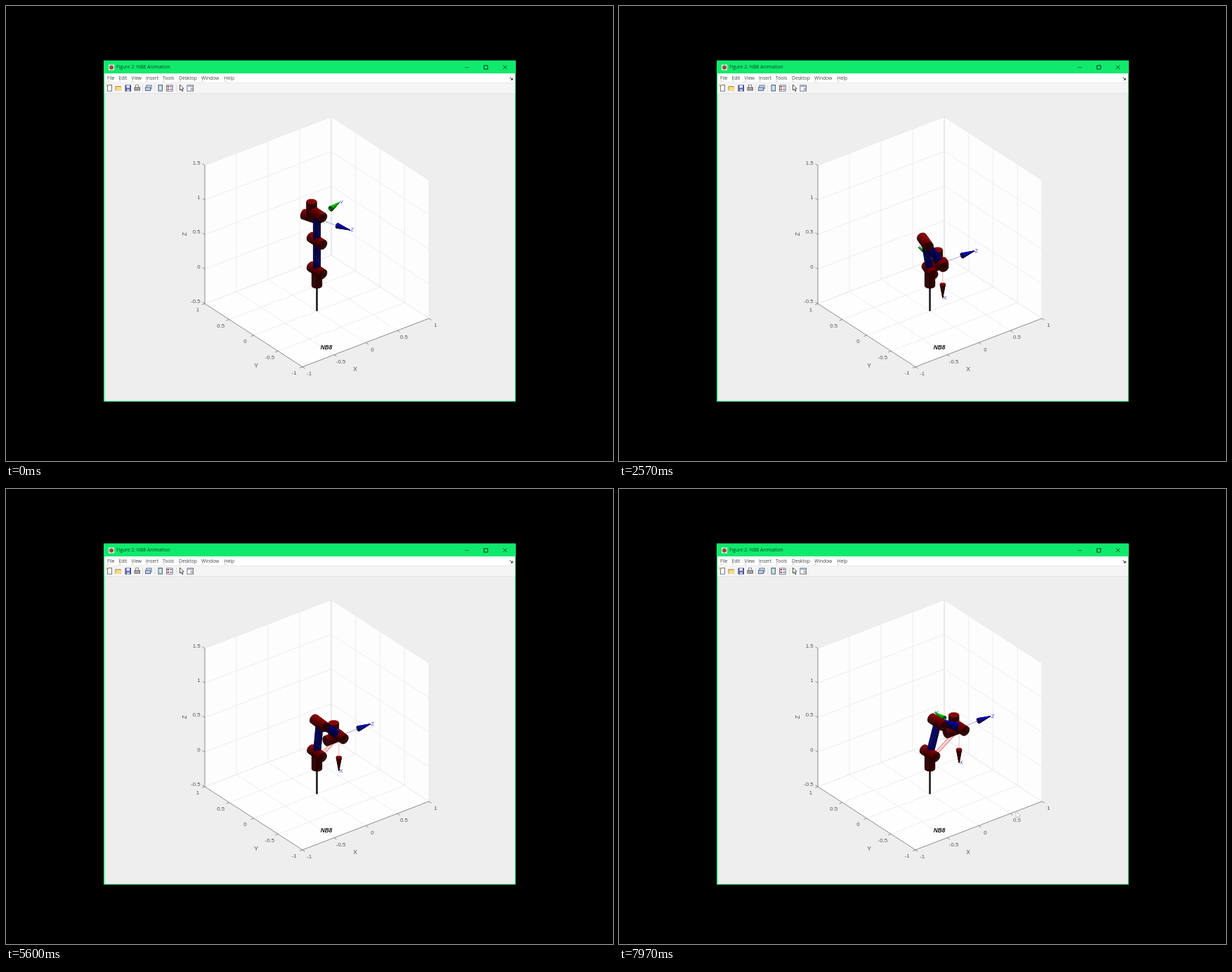
Write an HTML page with a canvas that moves like this. It is 864 px wide and 648 px high and loops after 8000 ms.

```html
<!DOCTYPE html>
<html lang="en">
<head>
<meta charset="utf-8">
<title>Robot arm</title>
<style>
html, body { margin: 0; width: 100%; height: 100%; overflow: hidden; background: #000; }
canvas { display: block; }
</style>
</head>
<body>
<canvas id="stage" width="864" height="648"></canvas>
<script>
const LOOP = 8000, NAME = 'NB8';
const UI = '"Open Sans", "Noto Sans", sans-serif';
const PLOT = '"Liberation Sans", Arial, sans-serif';

// vectors and projection
const add = (a, b, k = 1) => a.map((v, i) => v + b[i] * k);
const dot = (a, b) => a[0] * b[0] + a[1] * b[1] + a[2] * b[2];
const cross = (a, b) => [a[1] * b[2] - a[2] * b[1], a[2] * b[0] - a[0] * b[2], a[0] * b[1] - a[1] * b[0]];
const unit = a => { const l = Math.hypot(...a); return a.map(v => v / l); };
const mix = (a, b, k) => a.map((v, i) => v + (b[i] - v) * k);
const project = ([x, y, z]) => [442.5 + 90 * x - 69.5 * y, 385.2 - 34.5 * x - 45 * y - 98.5 * z];
const VIEW = [-0.529, -0.685, 0.5];
const SIDE_LIGHT = unit([1, 0.5, 1]);
const UP = [0, 0, 1], DOWN = [0, 0, -1];

// arm geometry
const D1 = 0.0895, A2 = 0.425, A3 = 0.392, D4 = 0.109, D5 = 0.0947, D6 = 0.0823;
const JOINT_R = 0.064, JOINT_HALF = 0.125, LINK_R = 0.045, AXIS = 0.5;
const RED = [1, 0, 0], GREEN = [0.05, 1.6, 0.05], BLUE = [0.03, 0.03, 1.5];
const SHOULDER = [0, 0, D1];
const PATH_A = [0.106, 0.0495, 0.1475], PATH_B = [0.4654, 0.112, 0.303];
const TOOL = [D6, 0, -D5];

function line(g, pts, color, width = 1, close = false) {
  g.beginPath();
  pts.forEach((p, i) => i ? g.lineTo(p[0], p[1]) : g.moveTo(p[0], p[1]));
  if (close) g.closePath();
  g.strokeStyle = color;
  g.lineWidth = width;
  g.stroke();
}

function fillPoly(g, pts, color) {
  g.beginPath();
  pts.forEach(p => g.lineTo(p[0], p[1]));
  g.closePath();
  g.fillStyle = color;
  g.fill();
}

function rect(g, x, y, w, h, color) {
  g.fillStyle = color;
  g.fillRect(x, y, w, h);
}

function text(g, str, x, y, font, color, align = 'center') {
  g.font = font;
  g.fillStyle = color;
  g.textAlign = align;
  g.textBaseline = 'middle';
  g.fillText(str, x, y);
}

function drawIcons(g) {
  const y = 112, ink = '#4a5672';
  const box = (x, yy, w, h, fill, edge = ink) => {
    rect(g, x, yy, w, h, edge);
    rect(g, x + 0.8, yy + 0.8, w - 1.6, h - 1.6, fill);
  };
  box(144, y, 7, 9.5, '#fff');
  rect(g, 143, y, 3, 2.5, '#e0a060');
  box(155.5, y + 2, 8, 7, '#f1d27b', '#a98032');
  fillPoly(g, [[155.5, 121], [158, 116], [165.5, 116], [163, 121]], '#f6dc8c');
  box(169.5, y + 0.5, 8.5, 9, '#5b67b5', '#30386e');
  rect(g, 171.5, y + 1, 4.5, 3.5, '#eef');
  rect(g, 172, y + 6.5, 4, 3, '#ccd');
  box(184, y, 5, 5, '#fff', '#777');
  box(182.5, y + 3.5, 8.5, 5, '#a8a8a8', '#555');
  box(199.5, y + 0.5, 8, 6, '#cfe0f4');
  box(198, y + 3.5, 8, 5.5, '#b8cce8');
  box(216.5, y, 6.5, 9.5, '#9fc7df');
  rect(g, 218, y + 2, 3.5, 5.5, '#d7e7cf');
  box(228, y + 0.5, 9.5, 9, '#fff');
  for (const yy of [2, 5.5]) {
    rect(g, 229.5, y + yy, 2.5, 2, '#a33');
    rect(g, 233, y + yy + 0.5, 3.5, 1, '#447');
  }
  const p = [[247.5, 112], [247.5, 120], [249.4, 118.3], [250.8, 121.5], [252, 121], [250.7, 118], [253, 117.6]];
  fillPoly(g, p, '#fff');
  line(g, p, '#222', 0.8, true);
  box(257.5, y + 0.5, 9.5, 9, '#fff');
  rect(g, 258.5, y + 1.5, 7.5, 1.5, '#8ba3c8');
  rect(g, 262.5, y + 4, 3.5, 4.5, '#c5b9b2');
  for (const x of [194, 211.5, 242]) rect(g, x, 112, 0.7, 10, '#d4d4d4');
}

function drawWindow(g) {
  rect(g, 0, 0, 864, 648, '#000');
  rect(g, 139, 77.5, 586.5, 486, '#2be880');
  rect(g, 140.5, 96, 584, 466.5, '#eeeeee');
  rect(g, 139, 78, 586.5, 18, '#10ea6c');
  rect(g, 140.5, 96, 584, 13.5, '#fdfefd');
  rect(g, 140.5, 109.5, 584, 15, '#f5f5f5');
  rect(g, 140.5, 109, 584, 0.6, '#e2e2e2');
  rect(g, 140.5, 124, 584, 0.7, '#dedede');

  rect(g, 146, 83.5, 8, 8, '#e6efe8');
  g.beginPath();
  g.arc(150, 87.5, 3, 0, 7);
  g.fillStyle = '#a5443a';
  g.fill();
  text(g, `Figure 2: ${NAME} Animation`, 157, 87.5, '6.8px ' + UI, '#0b4526', 'left');
  line(g, [[653, 87.5], [659, 87.5]], '#0d6a38', 0.8);
  line(g, [[680.3, 84.8], [685.7, 84.8], [685.7, 90], [680.3, 90]], '#0a3a20', 1, true);
  line(g, [[707.5, 84.5], [713, 90]], '#0a3a20', 0.9);
  line(g, [[713, 84.5], [707.5, 90]], '#0a3a20', 0.9);

  const menu = { File: 144, Edit: 160.5, View: 178.5, Insert: 199, Tools: 223, Desktop: 246, Window: 278, Help: 310.5 };
  for (const [label, x] of Object.entries(menu)) {
    text(g, label, x, 103.2, '6.7px ' + UI, '#444', 'left');
    line(g, [[x, 107], [x + 3.2, 107]], '#888', 0.5);
  }
  line(g, [[717, 101.5], [720.5, 104.5]], '#333', 1);
  fillPoly(g, [[721.5, 102], [721.5, 105.5], [718, 105.5]], '#333');
  drawIcons(g);
}

function drawAxes(g) {
  const P = (x, y, z) => project([x, y, z]);
  const lo = -0.5, hi = 1.5;
  fillPoly(g, [P(-1, -1, lo), P(1, -1, lo), P(1, 1, lo), P(-1, 1, lo)], '#fefefe');
  fillPoly(g, [P(-1, 1, lo), P(1, 1, lo), P(1, 1, hi), P(-1, 1, hi)], '#fdfdfd');
  fillPoly(g, [P(1, -1, lo), P(1, 1, lo), P(1, 1, hi), P(1, -1, hi)], '#fdfdfd');
  const grid = '#e9e9f0';
  for (let i = 0; i <= 4; i++) {
    const v = -1 + i / 2, z = lo + i / 2;
    line(g, [P(v, -1, lo), P(v, 1, lo), P(v, 1, hi)], grid, 0.8);
    line(g, [P(-1, v, lo), P(1, v, lo), P(1, v, hi)], grid, 0.8);
    line(g, [P(-1, 1, z), P(1, 1, z), P(1, -1, z)], grid, 0.8);
  }
  line(g, [P(1, 1, lo), P(1, 1, hi)], '#dcdce6', 0.8);
  line(g, [P(-1, 1, hi), P(-1, 1, lo), P(-1, -1, lo), P(1, -1, lo)], '#777', 0.8);

  const font = '7.8px ' + PLOT, ink = '#555';
  const tick = (p, dx, dy) => line(g, [p, [p[0] + dx, p[1] + dy]], '#777', 0.8);
  for (let i = 0; i <= 4; i++) {
    const v = -1 + i / 2, z = lo + i / 2;
    const px = P(v, -1, lo), py = P(-1, v, lo), pz = P(-1, 1, z);
    tick(px, 3.5, 2.3);
    tick(py, -4, 1.5);
    tick(pz, -3.5, -2.3);
    text(g, String(v), px[0] + 9.5, px[1] + 10, font, ink);
    text(g, String(v), py[0] - (v === 1 ? 10 : 12), py[1] + 9, font, ink);
    text(g, String(z), 276.5, pz[1] - 3.3, font, ink, 'right');
  }
  text(g, 'X', 497, 518, '8.6px ' + PLOT, ink);
  text(g, 'Y', 356, 513, '8.6px ' + PLOT, ink);
  g.save();
  g.translate(254.5, 325);
  g.rotate(-Math.PI / 2);
  text(g, 'Z', 0, 0, '8.6px ' + PLOT, ink);
  g.restore();
  text(g, NAME, 456, 486.7, 'italic bold 8.2px ' + PLOT, '#111');
  line(g, [P(0, 0, lo), P(0, 0, 0)], '#111', 2.5);
}

// pose from joint positions
function makePose(u, n, elbow, wrist, toolZ) {
  const w4 = add(wrist, n, D4), p5 = add(w4, DOWN, D5);
  return { u, n, elbow, wrist, w4, p5, toolZ, tip: add(p5, toolZ, D6) };
}

function homePose() {
  const a = 18 * Math.PI / 180;
  return makePose([1, 0, 0], [0, 1, 0], [0, 0, D1 + A2], [0, 0, D1 + A2 + A3],
    [Math.sin(a), -Math.cos(a), 0]);
}

// closed-form inverse kinematics with the tool level along +x
function reachPose(f) {
  const [x, y, z] = mix(PATH_A, PATH_B, f);
  const rho = Math.sqrt(Math.max(0, x * x + y * y - D4 * D4)), h = z - D1;
  const yaw = Math.atan2(y, x) - Math.atan2(D4, rho);
  const u = [Math.cos(yaw), Math.sin(yaw), 0], n = [-u[1], u[0], 0];
  const d = Math.hypot(rho, h);
  const c = (A2 * A2 + d * d - A3 * A3) / (2 * A2 * d);
  const lift = Math.atan2(h, rho) + Math.acos(Math.max(-1, Math.min(1, c)));
  const inPlane = (r, v) => add(add(SHOULDER, u, r), UP, v);
  return makePose(u, n, inPlane(A2 * Math.cos(lift), A2 * Math.sin(lift)), inPlane(rho, h), [1, 0, 0]);
}

const progress = t => {
  const f = (t - 1470) / 6500;
  return f < 0 ? 0.015 * (Math.exp(f / 0.015) - 1) : f;
};

// depth-sorted faces
function shade(base, n) {
  const l = 0.17 + 0.28 * Math.max(0, n[2]) + 0.08 * Math.max(0, dot(n, SIDE_LIGHT));
  return `rgb(${base.map(c => Math.round(Math.min(255, 255 * c * l))).join()})`;
}

function face(list, pts, n, base) {
  if (dot(n, VIEW) <= 0) return;
  const mid = pts.reduce((s, p) => add(s, p, 1 / pts.length), [0, 0, 0]);
  const color = shade(base, n);
  list.push({ depth: dot(mid, VIEW), draw(g) {
    const q = pts.map(project);
    fillPoly(g, q, color);
    line(g, q, color, 0.5, true);
  } });
}

function tube(list, a, b, r0, r1, base) {
  const axis = add(b, a, -1), len = Math.hypot(...axis), w = unit(axis);
  const e1 = unit(cross(w, Math.abs(w[2]) > 0.8 ? [1, 0, 0] : UP)), e2 = cross(w, e1);
  const N = 20, M = Math.ceil(len / 0.035);
  const dir = i => {
    const k = i * 2 * Math.PI / N;
    return add(e1.map(v => v * Math.cos(k)), e2, Math.sin(k));
  };
  const ring = (j, i) => add(mix(a, b, j / M), dir(i), r0 + (r1 - r0) * j / M);
  for (let i = 0; i < N; i++) {
    const n = unit(add(dir(i + 0.5), w, (r0 - r1) / len));
    for (let j = 0; j < M; j++) face(list, [ring(j, i), ring(j, i + 1), ring(j + 1, i + 1), ring(j + 1, i)], n, base);
    face(list, [a, ring(0, i), ring(0, i + 1)], w.map(v => -v), base);
    if (r1 > 0) face(list, [b, ring(M, i), ring(M, i + 1)], w, base);
  }
}

const joint = (list, p, axis) =>
  tube(list, add(p, axis, -JOINT_HALF), add(p, axis, JOINT_HALF), JOINT_R, JOINT_R, RED);
const link = (list, a, b) => tube(list, a, b, LINK_R, LINK_R, BLUE);

function arrow(list, origin, dir, base, lineColor, label) {
  const end = add(origin, dir, AXIS), neck = add(origin, dir, AXIS * 0.61);
  for (let i = 0; i < 12; i++) {
    const a = mix(origin, neck, i / 12), b = mix(origin, neck, (i + 1) / 12);
    list.push({ depth: dot(a, VIEW), draw: g => line(g, [project(a), project(b)], lineColor, 0.7) });
  }
  tube(list, neck, end, 0.034, 0, base);
  list.push({ depth: dot(end, VIEW), draw(g) {
    const [x, y] = project(end);
    text(g, label, x + 3, y + 0.3, '7.8px ' + PLOT, '#4a4ad0');
  } });
}

function drawTrail(g, f) {
  const ends = [-0.17, f].map(k => project(add(mix(PATH_A, PATH_B, k), TOOL)));
  line(g, ends, '#d87474', 5);
  line(g, ends, '#fbd3d3', 3.3);
}

function drawRobot(g, p) {
  const list = [];
  joint(list, [0, 0, -0.01], UP);
  joint(list, SHOULDER, p.n);
  joint(list, p.elbow, p.n);
  joint(list, p.wrist, p.n);
  joint(list, p.w4, UP);
  joint(list, p.p5, p.toolZ);
  link(list, SHOULDER, p.elbow);
  link(list, p.elbow, p.wrist);
  link(list, p.wrist, p.w4);
  link(list, p.w4, p.p5);
  arrow(list, p.tip, DOWN, RED, '#e0a0a0', 'X');
  arrow(list, p.tip, cross(p.toolZ, DOWN), GREEN, '#a8d8a8', 'Y');
  arrow(list, p.tip, p.toolZ, BLUE, '#8c8cb4', 'Z');
  list.sort((a, b) => a.depth - b.depth).forEach(s => s.draw(g));
}

function drawPointer(g) {
  const p = [[565, 459], [565, 468.5], [567.2, 466.5], [568.8, 470], [570.2, 469.4], [568.7, 466], [571.5, 465.8]];
  fillPoly(g, p, '#fff');
  line(g, p, '#b5b5b5', 0.8, true);
}

const ctx = document.getElementById('stage').getContext('2d');
const backdrop = document.createElement('canvas');
backdrop.width = 864;
backdrop.height = 648;
const back = backdrop.getContext('2d');
drawWindow(back);
drawAxes(back);

const start = performance.now();
function render(now) {
  const t = Math.max(0, now - start) % LOOP;
  ctx.drawImage(backdrop, 0, 0);
  if (t < 30) {
    drawRobot(ctx, homePose());
  } else {
    const f = progress(t);
    drawTrail(ctx, f);
    drawRobot(ctx, reachPose(f));
  }
  if (t > 7700) drawPointer(ctx);
  requestAnimationFrame(render);
}
render(start);
</script>
</body>
</html>
```
